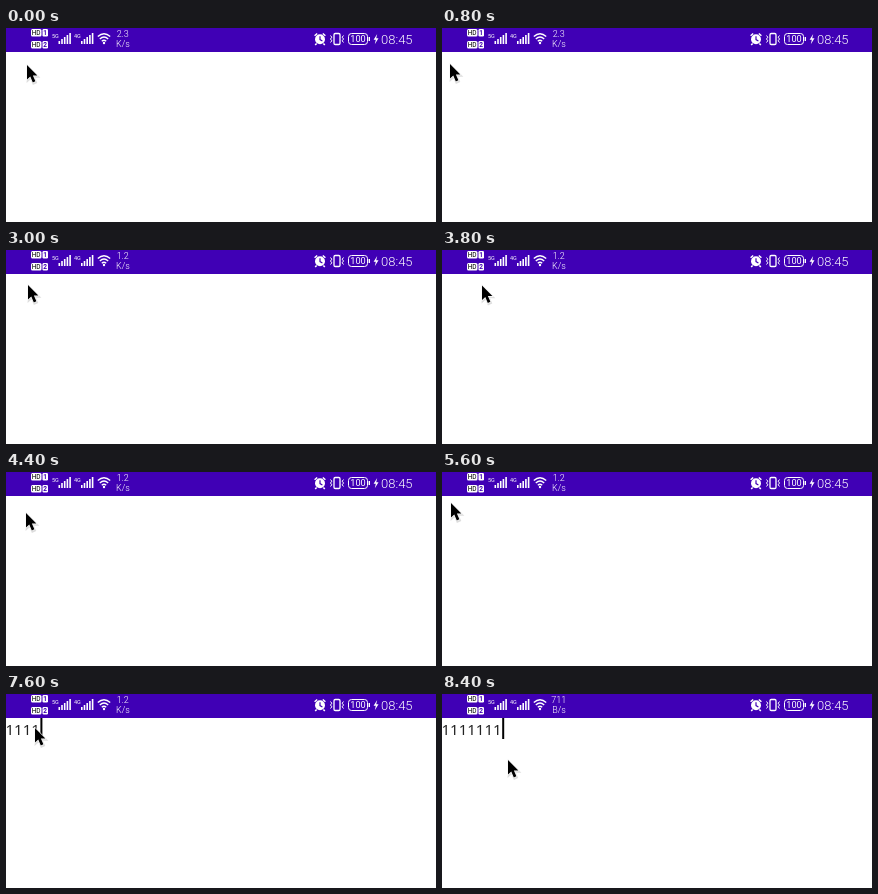
An HTML page for the animation above (8600 ms loop, 430x194 px).

```html
<!DOCTYPE html>
<html lang="en">
<head>
<meta charset="utf-8">
<title>Typing on a phone screen</title>
<style>
  html, body { margin: 0; width: 100%; height: 100%; overflow: hidden; background: #fff; }
  svg { display: block; }
  text { font-family: Roboto, "Noto Sans", sans-serif; }
  .bar text { fill: #fff; }
  .bar .cut { fill: #4000b5; font-weight: 700; }
  .line { fill: none; stroke: #fff; }
  #typed { font: 15px "Noto Sans", "Open Sans", sans-serif; fill: #222; }
</style>
</head>
<body>
<svg width="430" height="194" viewBox="0 0 430 194">
  <defs>
    <g id="sim">
      <rect x="25" width="10.5" height="7.5" rx="1.5" fill="#fff"/>
      <text class="cut" x="30.2" y="6.2" font-size="6.5" text-anchor="middle">HD</text>
      <rect x="36.5" width="5.5" height="7.5" rx="1.2" fill="#fff"/>
    </g>
    <path id="signal" fill="#fff" d="M0 13h1.6v3H0zM2.7 11h1.6v5H2.7zM5.4 9H7v7H5.4zM8.1 7h1.6v9H8.1zM10.8 5h1.6v11h-1.6z"/>
  </defs>
  <g class="bar">
    <rect width="430" height="24" fill="#4000b5"/>
    <use href="#sim" y="1"/>
    <text class="cut" x="39.2" y="7.2" font-size="6.5" text-anchor="middle">1</text>
    <use href="#sim" y="13"/>
    <text class="cut" x="39.2" y="19.2" font-size="6.5" text-anchor="middle">2</text>
    <text x="46" y="9.5" font-size="5.5">5G</text>
    <use href="#signal" x="52.5"/>
    <text x="68" y="9.5" font-size="5.5">4G</text>
    <use href="#signal" x="75"/>
    <g class="line" stroke-width="1.4">
      <path d="M91.8 8.6Q98 3 104.2 8.6M93.8 11Q98 7.2 102.2 11M95.8 13.2Q98 11.2 100.2 13.2"/>
    </g>
    <circle cx="98" cy="15" r="1.2" fill="#fff"/>
    <g font-size="9" font-weight="300" text-anchor="middle">
      <text id="rate" x="116.7" y="9"></text>
      <text id="unit" x="117" y="18.5"></text>
    </g>
    <circle cx="314" cy="11.3" r="5" fill="#fff"/>
    <path class="line" stroke-width="1.5" d="M308.6 7.8L311.2 5.5M319.4 7.8L316.8 5.5M310.6 15.4L309.2 17M317.4 15.4L318.8 17"/>
    <path d="M314 8.3V11.6L316.4 13" fill="none" stroke="#4000b5" stroke-width="1.2"/>
    <rect class="line" x="328" y="5.5" width="6" height="11" rx="1.3" stroke-width="1.3"/>
    <path class="line" d="M324.5 7.5L325.8 9.2L324.5 11L325.8 12.8L324.5 14.5M337.5 7.5L336.2 9.2L337.5 11L336.2 12.8L337.5 14.5"/>
    <rect class="line" x="342.5" y="5.5" width="19" height="11" rx="3"/>
    <path class="line" stroke-width="1.4" d="M363.3 9V13"/>
    <text x="352" y="14.3" font-size="9.2" text-anchor="middle">100</text>
    <path d="M371.2 6L367.6 11.8H369.8L368.8 16.3L372.5 10.3H370.2Z" fill="#fff"/>
    <text x="375" y="15.6" font-size="13" font-weight="300">08:45</text>
  </g>
  <text id="typed" x="-0.5" y="41"></text>
  <rect id="caret" y="24" width="2" height="21" fill="#000"/>
  <g id="pointer">
    <path d="M0 0V14.6L3.3 11.6L5.8 17.4L8.4 16.2L5.9 10.6H10.4Z" transform="translate(.6 1.2)" fill="#000" stroke="#000" stroke-width="2" opacity=".13"/>
    <path d="M0 0V14.6L3.3 11.6L5.8 17.4L8.4 16.2L5.9 10.6H10.4Z" fill="#000" stroke="#fff" stroke-width="1.2" paint-order="stroke"/>
  </g>
</svg>
<script>
const STEP = 200, LOOP = 8600;
const byId = id => document.getElementById(id);
const [rate, unit, typed, caret, pointer] =
  ["rate", "unit", "typed", "caret", "pointer"].map(byId);

// Pointer waypoints: step, x, y
const path = [
  [0, 21, 37], [1, 26, 28], [2, 14, 24], [3, 3, 32], [4, 8, 36], [9, 8, 36],
  [10, 13, 34], [12, 3, 40], [13, 12, 38], [14, 12, 38], [15, 22, 35],
  [17, 44, 24], [18, 45, 32], [20, 35, 39], [22, 20, 41], [23, 16, 46],
  [25, 4, 26], [26, 2, 33], [28, 9, 31], [32, 9, 31], [38, 29, 34], [42, 66, 66]
];

function pointerAt(step) {
  const i = Math.max(1, path.findIndex(p => p[0] >= step));
  const [s0, x0, y0] = path[i - 1], [s1, x1, y1] = path[i];
  const k = (step - s0) / (s1 - s0);
  return [x0 + (x1 - x0) * k, y0 + (y1 - y0) * k];
}

function draw(now) {
  const step = Math.floor(now % LOOP / STEP);
  const count = Math.min(7, Math.max(0, step - 34));
  const [x, y] = pointerAt(step);
  pointer.setAttribute("transform", `translate(${x} ${y})`);
  typed.textContent = "1".repeat(count);
  caret.setAttribute("x", count * 8.6);
  caret.setAttribute("visibility", step < 33 ? "hidden" : "visible");
  rate.textContent = step < 11 ? "2.3" : step < 40 ? "1.2" : "711";
  unit.textContent = step < 40 ? "K/s" : "B/s";
}

const start = performance.now();
function tick() {
  draw(performance.now() - start);
  requestAnimationFrame(tick);
}
tick();
</script>
</body>
</html>
```
